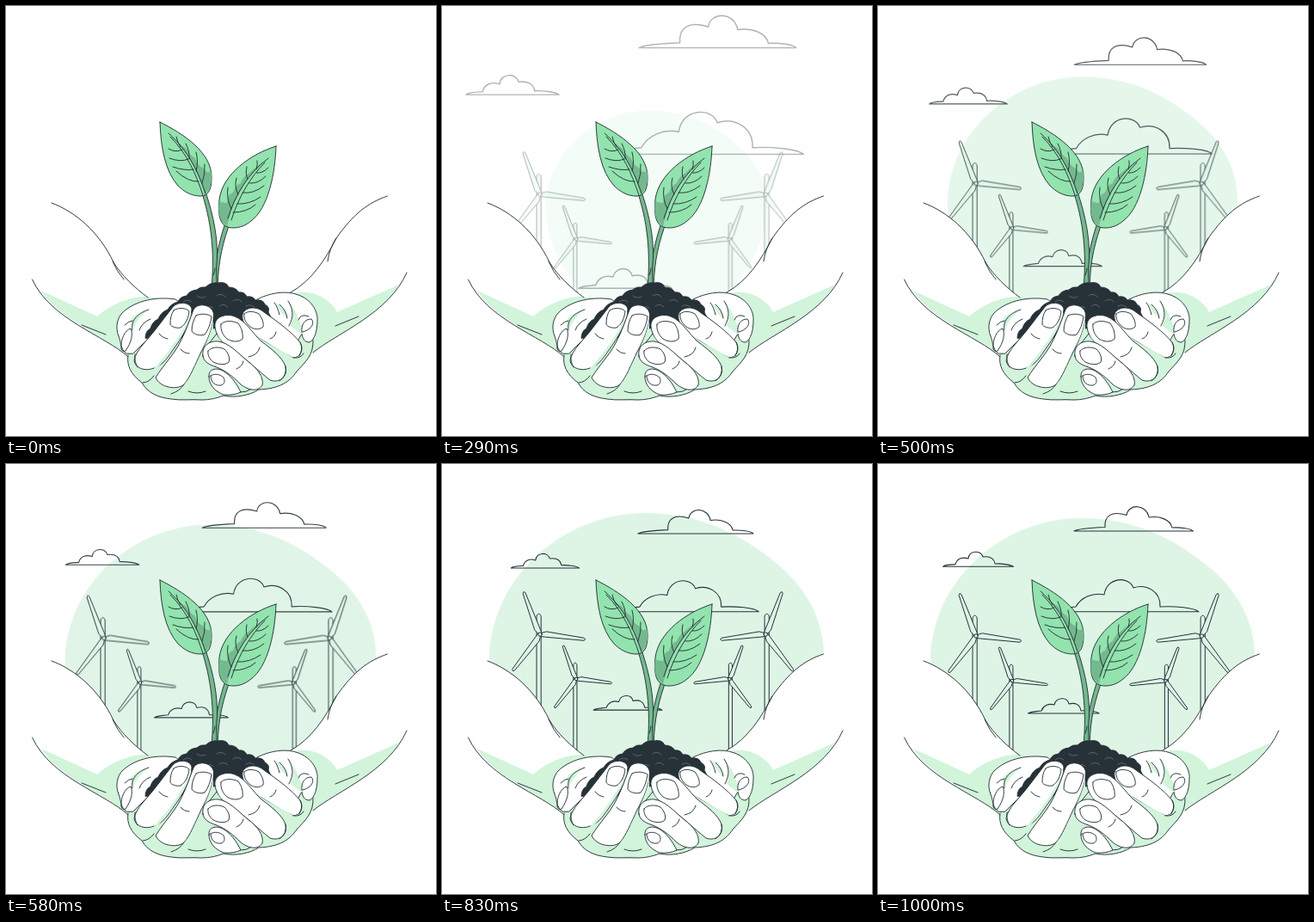
Write an HTML page without scripts that moves like this. It is 500x500 px and loops after 1040 ms.

```html
<!DOCTYPE html>
<html lang="en">
<head>
<meta charset="utf-8">
<title>Seedling in hands</title>
<style>
@property --t { syntax: "<number>"; inherits: true; initial-value: 0; }
html, body { margin: 0; width: 100%; height: 100%; overflow: hidden; background: #fff; }
svg {
  display: block; width: 100%; height: 100%;
  fill: none; stroke: #263238; stroke-linecap: round; stroke-linejoin: round;
  animation: clock 1.04s steps(25) -4ms infinite;
}
@keyframes clock { from { --t: .025 } to { --t: 1.0667 } }
@keyframes appear { from { visibility: hidden } 12%, to { visibility: visible } }

/* --y follows cubic-bezier(.36, -.01, .5, 1.38), held for each step of the clock */
.sky > * {
  --x: min(1, var(--t));
  --s: calc(var(--x) + var(--x) * (1 - var(--x)) * (-.12 + .98 * var(--x) - .53 * var(--x) * var(--x)));
  --y: calc(var(--s) * (-.03 + 4.2 * var(--s) - 3.17 * var(--s) * var(--s)));
  opacity: var(--y);
  animation: appear 1.04s step-end -4ms infinite;
}
.blob { fill: #def5e6; stroke: none; transform-origin: 249px 246px; transform: scale(calc(.5 + .5 * var(--y))); }
.clouds { stroke-width: 1.1; transform-origin: 224.5px 170px; transform: scale(calc(1.5 - .5 * var(--y))); }
.mills { transform: translateY(calc(30px * (1 - var(--y)))); fill: #def5e6; }
.mill { vector-effect: non-scaling-stroke; }
.still { stroke-width: .95; }
.white { fill: #fff; }
.shade { fill: #d1f4da; stroke: none; }
.bare { stroke: none; }
.leaf { fill: #92e3ae; }
.dark { fill: #74b98d; }
.soil { fill: #263238; }
.crumb { stroke: #7d878b; stroke-width: .6; }
</style>
</head>
<body>
<svg viewBox="0 0 500 500">
  <defs>
    <path class="mill" id="blade" d="M1 2 L2 -2 L7 -4 L51.5 -1.6 Q54.5 0 51.5 1.4 L6 2.4 Z"/>
    <g id="mill">
      <path class="mill" d="M-4 140 V-19 C-4.6 -25.4 1.8 -25.4 1.2 -19 V140"/>
      <use href="#blade" transform="rotate(6.5)"/>
      <use href="#blade" transform="rotate(127)"/>
      <use href="#blade" transform="rotate(249)"/>
      <circle class="mill" r="2.2"/>
    </g>
    <g id="pair">
      <use href="#mill" x="114" y="200"/>
      <use href="#mill" transform="translate(156 252) scale(.79)"/>
    </g>
  </defs>

  <g class="sky">
    <path class="blob" d="M61 229 C62 135 145 63 236 63 C300 63 345 88 380 116 C415 143 438 180 438 224 C438 330 340 429 250 429 C150 429 61 330 61 229 Z"/>
    <g class="clouds">
      <path d="M228 78 C233 75 252 74 264 73.5 C263 60 272 54 289 59.5 C291 46 312 46 315 62 C328 60 340 65 342 74 C352 73.500 364 75 366.5 78 Z"/>
      <path d="M75.500 119.3 C78 117 84 117 90 116.8 C92 109 99 108 105 110 C106 100 120 100 122 108 C130 107 135 110 136 116 C143 115.500 154 117 157.500 119.3 Z"/>
      <path d="M206 171.8 C210 167 222 167 230 166 C236 155 250 149 263 152 C266 131 292 130 297 144 C312 139 329 148 328 166 C345 165 368 167 373 171.8 Z"/>
      <path d="M174.500 290 C178 287.500 184 288 190 287 C192 281 198 278 205 280 C207 271 220 270 222 279 C230 277 235 280 236 287 C243 286.500 254 287 257 290 Z"/>
    </g>
    <g class="mills">
      <use href="#pair"/>
      <use href="#pair" transform="translate(490.3) scale(-1 1)"/>
    </g>
  </g>

  <g class="still">
  <g class="arms">
    <path class="white bare" d="M53 229 C80 239 108 262 125 298 C134 313 150 328 165 339 L200 341 L250 400 L150 415 L142 408 C115 383 52 365 30.500 318 Z"/>
    <path class="white bare" d="M443.500 221 C420 229 404 242 384 270 C372 294 355 320 331 333 L295 340 L250 400 L350 410 L357 403 C385 380 445 358 466 310 Z"/>
    <path class="shade" d="M41 331 L106 361 C120 348 145 337 163 338 L180 340 L150 360 L142 408 C122 387 66 369 41 331 Z"/>
    <path class="shade" d="M457 324 L385 356 C378 342 360 331 340 333 L325 336 L345 400 L357 403 C382 381 434 363 457 324 Z"/>
    <path d="M53 229 C80 239 108 262 125 298 C134 313 150 328 165 339 M124 297 Q129 309 137 318"/>
    <path d="M30.500 318 C52 365 115 383 142 408 M88 371 L116 382"/>
    <path d="M443.500 221 C420 229 404 242 384 270 C372 294 355 320 331 333 M384 270 Q376 282 374 297"/>
    <path d="M466 310 C445 358 385 380 357 403 M410 361 L383 372"/>
  </g>

  <g class="palms">
    <path class="shade" d="M142 404 C140 418 145 428 158 438 C165 450 176 455 192 457 C210 459 236 460 250 453 C266 456 283 453 294 446 C318 445 330 437 338 425 C348 414 358 406 357 388 L320 370 L245 360 L160 385 Z"/>
    <path d="M142 406 C140 418 145 428 158 438 C165 450 176 455 192 457 C204 459 216 457 228 458 C237 458 245 456 253 453 C266 456 283 453 294 446 C318 445 330 437 338 425 C348 414 358 406 357 388"/>
    <path class="white" d="M140 404 C133 400 134 391 131 384 C127 374 129 364 135 357 C147 345 170 337 197 341 L206 348 L160 392 L148 404 Z"/>
    <path class="white" d="M292 341 C306 334 325 330 340 336 C354 341 363 354 362 366 C362 377 359 388 353 391 C347 391 345 387 344 381 L336 395 L300 360 Z"/>
    <path class="shade" d="M147 362 C154 355 160 357 165 353 C156 361 151 368 148 376 C145 372 144 367 147 362 Z M314 346 C322 349 327 356 327 364 C322 359 317 353 314 346 Z M328 343 C334 352 335 361 331 372 L344 382 L344 372 C340 364 337 352 328 343 Z"/>
    <path d="M134 398 C133 388 138 377 145 375 C148 381 146 391 139 401 Q135 403 134 398 M147 377 C145 367 151 358 166 353 M155 377 Q158 368 168 364 M138 371 Q143 366 147 366"/>
    <path d="M344 379 C343 371 347 364 355 364 C359 368 356 375 348 378 Z M312 345 Q316 350 318 359 M328 343 C334 352 335 361 329 372 M318 347 Q326 354 327 363 M352 361 Q343 357 340 365"/>
  </g>

  <g class="plant">
    <path class="dark" d="M240 327 C242 302 248 270 257 247 L261.500 249 C252 275 247 295 246 327 Z"/>
    <path class="dark" d="M239 327 C242 296 241 258 228 218 L232 216 C242 246 246 270 245.500 293 C244 305 245 315 245 327"/>
    <path class="leaf" d="M179 135 C205 148 240 170 239 200 C239 212 236 221 226 221 C216 221 207 216 200 209 C185 192 180 165 179 135 Z"/>
    <path class="dark bare" d="M191 151 Q203 163 209 165 Q214 174 219 176 Q224 187 229 188 Q232 195 238.500 192 Q241 211 231 219 C224 195 212 168 191 151 Z"/>
    <path d="M189 148 C212 168 224 194 232 218 M191 152 C211 172 221 196 229 220 M203 164 Q199 158 198 152 M213 178 Q214 169 209 160 M221 192 Q224 181 221 170 M228 206 Q232 195 231 184 M205 167 Q197 171 189 166 M212 178 Q203 182 190 177 M218 190 Q208 192 194 187 M224 204 Q212 205 198 192"/>
    <path class="leaf" d="M314 163 C285 172 252 195 248 225 C246 245 249 258 264 258 C272 258 279 255 285 250 C305 235 313 195 314 163 Z"/>
    <path class="dark bare" d="M304 178 Q289 188 282 195 Q276 198 273 206 Q266 209 264 217 Q258 218 257 229 Q250 229 248 226 C246 240 248 250 257 256 C266 220 281 196 304 178 Z"/>
    <path d="M305 177 C282 194 266 220 258 247 M301 182 C284 199 270 223 262 249 M291 190 Q293 184 292 180 M281 201 Q278 196 280 187 M270 219 Q265 210 268 200 M262 236 Q256 224 258 211 M291 194 Q298 195 305 188 M283 206 Q293 207 302 198 M275 217 Q287 219 300 209 M269 230 Q283 231 296 222 M264 240 Q280 240 290 231"/>
    <path d="M241 313 Q243 309 243 305"/>
  </g>

  <path class="soil" d="M162 386 Q162 378 168 375 Q170 367 177 364 Q180 356 188 353 Q192 346 200 344 Q202 338 210 337 Q213 331 222 330 Q226 326 232 327 Q238 321 246 322 Q256 320 259 327 Q267 327 271 333 Q277 332 280 338 Q287 337 290 342 Q299 341 301 347 Q307 350 305 356 L310 366 L280 380 L244 374 L215 385 Z"/>
  <path class="crumb" d="M206 344 Q211 340 216 344 M222 337 Q227 341 232 338 M245 337 Q250 333 255 338 M264 343 Q270 339 274 344 M248 349 Q253 345 258 350 M279 349 Q284 346 289 350 M183 363 Q188 364 191 359 M233 350 Q237 348 241 351"/>

  <g class="left-fingers">
    <path class="white" d="M194 350 C200 343 214 344 216 352 C216 368 204 386 194 400 C186 412 180 419 172 421 C163 425 150 422 149 412 C151 400 165 388 174 376 Z"/>
    <path class="shade" d="M216 356 C213 372 198 394 187 408 L174 424 L172 421 C184 410 207 378 216 356 Z"/>
    <path class="white" d="M218 353 C223 344 241 347 241.500 359 C241 374 234 389 227 402 C220 417 214 432 207 440 C199 447 179 444 174 432 C184 416 195 406 203 390 C210 376 214 364 218 353 Z"/>
    <path class="shade" d="M241 362 C240 383 225 407 218 423 Q212 437 205 442 L209 441 C221 425 236 398 241 378 Z"/>
    <path class="white" d="M195 354 C200 350 210 351 213 355 C212 363 209 370 203 374 C198 375 192 373 191 370 C191 364 192 358 195 354 Z"/>
    <path class="white" d="M221 360 C226 357 235 358 239 361 C238 369 235 377 231 382 C226 384 218 382 216 378 C216 371 218 365 221 360 Z"/>
    <path d="M178 381 Q182 386 188 387 M203 399 Q207 404 213 404 M150 405 Q149 414 153 420 M172 430 Q166 438 159 438 M207 440 Q202 448 192 451 M212 448 Q222 452 232 448"/>
  </g>

  <g class="right-fingers">
    <path class="shade" d="M230 398 C228 410 234 418 243 421 L262 424 L262 388 L243 378 Z"/>
    <path d="M229 407 Q230 397 238 390 L245 381"/>
    <path class="white" d="M275 358 C279 349 292 349 300 356 C316 367 332 379 342 391 C347 399 342 409 334 409 C320 403 306 393 294 386 C283 380 273 368 275 358 Z"/>
    <path class="shade" d="M279 371 C293 390 318 398 334 409 Q340 409 343 404 Q341 415 328 420 L300 395 Z"/>
    <path class="white" d="M243 374 C241 361 256 357 266 361 C279 366 287 381 297 390 C309 399 321 408 325 419 C328 431 318 439 307 435 C292 423 280 411 268 403 C254 395 245 386 243 374 Z"/>
    <path class="shade" d="M246 383 C256 399 287 412 302 434 Q304 441 297 445 L284 420 Z"/>
    <path class="white" d="M236 431 C235 422 244 420 252 424 C262 430 268 439 273 449 Q265 453 253 452 C243 448 236 441 236 431 Z"/>
    <path class="white" d="M229 407 C227 394 238 389 247 390 C260 392 270 404 281 413 C293 422 300 432 298 441 C293 449 282 447 273 440 C263 430 255 424 245 420 C236 417 230 414 229 407 Z"/>
    <path class="white" d="M277 358 C281 354 289 355 294 358 C298 363 300 369 299 373 C295 377 288 376 284 373 C279 369 276 363 277 358 Z"/>
    <path class="white" d="M250 370 C254 365 264 366 270 369 C274 374 276 382 275 387 C271 391 263 391 257 387 C252 383 249 376 250 370 Z"/>
    <path class="white" d="M235 401 C239 396 248 396 254 399 C258 403 261 409 259 414 C255 418 247 417 241 414 C237 411 234 406 235 401 Z"/>
    <path class="white" d="M238 430 C242 427 249 428 253 432 C255 436 254 440 250 441 C244 442 238 438 238 430 Z"/>
    <path d="M307 387 Q313 385 314 379 M282 408 Q293 406 295 397 M268 422 Q275 419 276 413 M342 391 Q346 399 341 407 M325 419 Q327 430 318 436 M334 409 Q343 410 346 404 M273 449 Q280 449 284 446"/>
  </g>
  </g>
</svg>
</body>
</html>
```
